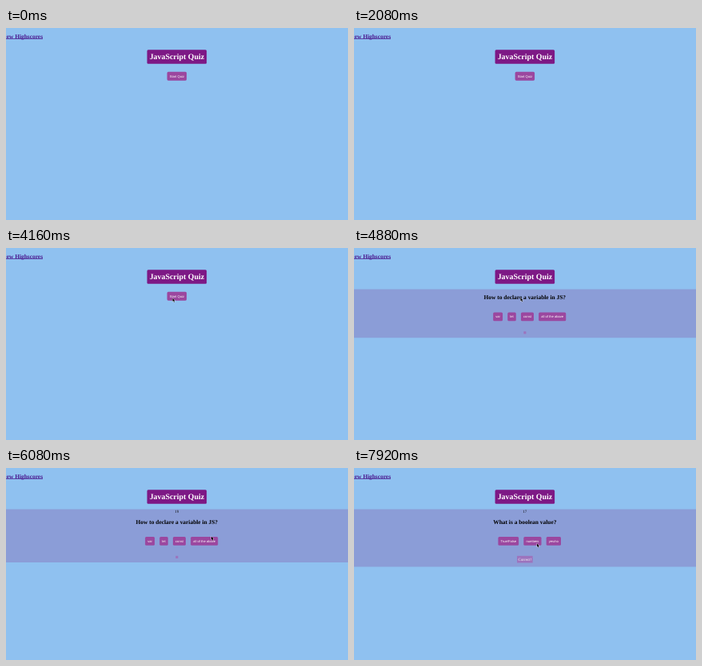
An HTML page with a canvas that plays this animation: 428 px wide and 240 px high, repeating every 8 s.

```html
<!DOCTYPE html>
<html lang="en">
<head>
<meta charset="utf-8">
<title>JavaScript Quiz</title>
<style>
html, body { margin: 0; width: 100%; height: 100%; overflow: hidden; background: #8fc1f0; }
canvas { display: block; width: 428px; height: 240px; }
</style>
</head>
<body>
<canvas id="stage"></canvas>
<script>
const LOOP = 8000, STEP = 80;
const SCALE = 0.309; // page pixels to stage pixels
const MID = 692;
const SERIF = '"Liberation Serif", "Times New Roman", serif';
const SANS = '"Liberation Sans", Arial, sans-serif';
const QUIZ_START = 4880, NEXT_QUESTION = 6960;

const questions = [
  { text: 'How to declare a variable in JS?', answers: ['var', 'let', 'const', 'all of the above'], feedback: '' },
  { text: 'What is a boolean value?', answers: ['True/False', 'numbers', 'yes/no'], feedback: 'Correct!' }
];

// Pointer stops: time, x, y in stage pixels
const path = [
  [3520, 216, 79], [4160, 208.5, 62.8], [5440, 208.5, 62],
  [5840, 257, 80.5], [6240, 257, 88.5], [6320, 256, 89.5],
  [6480, 252, 90.5], [7680, 252, 90.5], [7920, 229, 94.5]
];

const canvas = document.getElementById('stage');
const ctx = canvas.getContext('2d');
const dpr = window.devicePixelRatio || 1;
canvas.width = 428 * dpr;
canvas.height = 240 * dpr;

function box(x, y, w, h, color, radius = 0) {
  ctx.fillStyle = color;
  ctx.beginPath();
  ctx.roundRect(x, y, w, h, radius);
  ctx.fill();
}

function text(str, x, y, font, color, align = 'center') {
  ctx.font = font;
  ctx.fillStyle = color;
  ctx.textAlign = align;
  ctx.fillText(str, x, y);
}

function buttonRow(labels, center, y) {
  const font = '13.333px ' + SANS, gap = 20;
  ctx.font = font;
  const widths = labels.map(s => ctx.measureText(s).width + 20);
  const total = widths.reduce((a, b) => a + b, gap * (labels.length - 1));
  let x = center - total / 2;
  labels.forEach((label, i) => {
    box(x, y, widths[i], 35, '#9b479f', 5);
    text(label, x + widths[i] / 2, y + 22.2, font, '#fff');
    x += widths[i] + gap;
  });
}

function header() {
  text('View Highscores', 149, 41.5, 'bold 24px ' + SERIF, '#4b1a8f', 'right');
  box(-24, 43, 173, 2, '#4b1a8f');
  const font = 'bold 32px ' + SERIF;
  ctx.font = font;
  const w = ctx.measureText('JavaScript Quiz').width + 20;
  box(MID - w / 2, 88, w, 57, '#7d1885', 5);
  text('JavaScript Quiz', MID, 127, font, '#fff');
}

function quiz(t) {
  const { text: question, answers, feedback } = questions[t < NEXT_QUESTION ? 0 : 1];
  const ticks = Math.floor((t - 4860) / 1000);
  const shift = ticks > 0 ? 18 : 0;
  const noteHeight = feedback ? 28 : 10;
  box(0, 166.5, 1400, 187 + shift + noteHeight, '#8b9dd7');
  if (ticks > 0) text(String(20 - ticks), MID, 181, '16px ' + SERIF, '#111');
  text(question, MID, 208 + shift, 'bold 24px ' + SERIF, '#000');
  buttonRow(answers, 711, 260.5 + shift);

  const font = '16px ' + SERIF;
  ctx.font = font;
  const w = ctx.measureText(feedback).width + 10;
  box(MID - w / 2, 337.5 + shift, w, noteHeight, '#9c73bd');
  text(feedback, MID, 356.5 + shift, font, '#fff');
}

function pointerAt(t) {
  const i = path.findIndex(p => p[0] > t);
  if (i < 0) return path[path.length - 1].slice(1);
  const [t0, x0, y0] = path[i - 1], [t1, x1, y1] = path[i];
  const u = (t - t0) / (t1 - t0), e = u * u * (3 - 2 * u);
  return [x0 + (x1 - x0) * e, y0 + (y1 - y0) * e];
}

function pointer(t) {
  if (t < path[0][0]) return;
  const [x, y] = pointerAt(t);
  ctx.save();
  ctx.translate(x / SCALE, y / SCALE);
  ctx.beginPath();
  ctx.moveTo(0, 0);
  [[0, 13], [3, 10.5], [5.5, 16], [8, 15], [5.5, 9.5], [9.5, 9.5]].forEach(p => ctx.lineTo(...p));
  ctx.closePath();
  ctx.lineWidth = 2;
  ctx.strokeStyle = '#fff';
  ctx.stroke();
  ctx.fillStyle = '#000';
  ctx.fill();
  ctx.restore();
}

function draw(now) {
  const t = Math.floor((now % LOOP) / STEP) * STEP;
  ctx.setTransform(SCALE * dpr, 0, 0, SCALE * dpr, 0, 0);
  ctx.textRendering = 'geometricPrecision';
  box(0, 0, 1400, 800, '#8fc1f0');
  header();
  if (t < QUIZ_START) buttonRow(['Start Quiz'], MID, 177.5);
  else quiz(t);
  pointer(t);
}

const start = performance.now();
function frame() {
  draw(performance.now() - start);
  requestAnimationFrame(frame);
}
frame();
</script>
</body>
</html>
```
